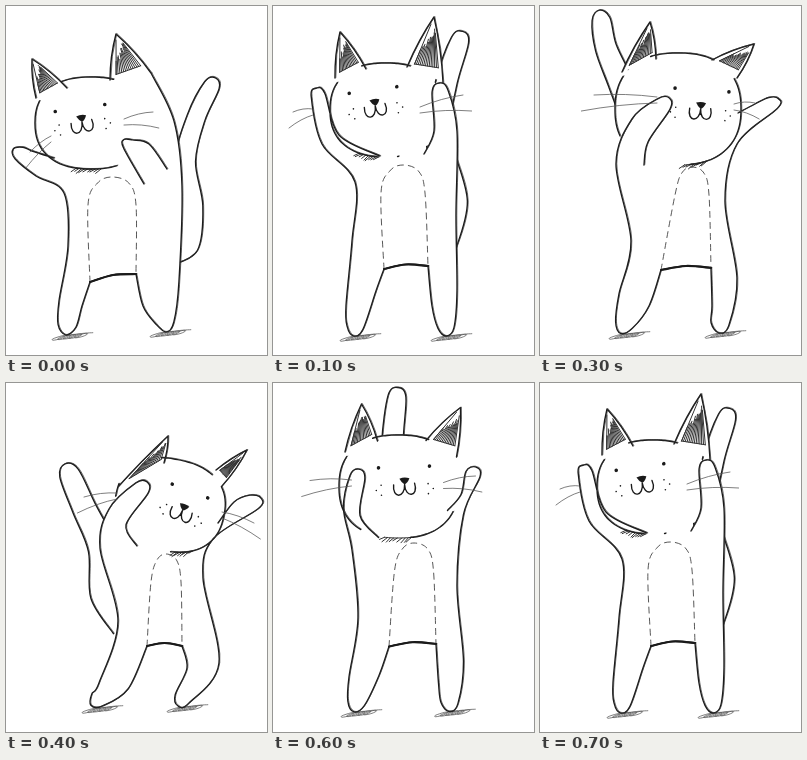
Write an HTML page that moves like this. It is 261 px wide and 349 px high and loops after 0.8 s.

```html
<!DOCTYPE html>
<html lang="en">
<head>
<meta charset="utf-8">
<title>Dancing cat</title>
<style>
  html, body { margin: 0; width: 100%; height: 100%; overflow: hidden; background: #fff; }
  svg { display: block; width: 100vw; height: 100vh; }
  path { fill: none; stroke: #1a1a1a; stroke-linecap: round; stroke-linejoin: round; }
  .fill { fill: #fff; stroke: none; }
  .ink { stroke-width: 1.4; }
  .echo { stroke-width: .7; stroke: #333; }
  .bold { stroke-width: 2.2; }
  .thin { stroke-width: .75; stroke: #555; }
  .hatch { stroke-width: 1; stroke: #333; }
  .belly { stroke-width: .9; stroke: #444; stroke-dasharray: 6 5; }
  .dot { fill: #1a1a1a; stroke: none; }
  .pose { visibility: hidden; animation: .8s step-end infinite; }
  .lean { animation-name: lean; }
  .stand { animation-name: stand; }
  .rise { animation-name: rise; }
  .sway { animation-name: sway; }
  .dip { animation-name: dip; }
  @keyframes lean { 0% { visibility: visible } 12.5%, 100% { visibility: hidden } }
  @keyframes stand { 0%, 25% { visibility: hidden } 12.5%, 87.5%, 100% { visibility: visible } }
  @keyframes rise { 0%, 37.5%, 87.5%, 100% { visibility: hidden } 25%, 75% { visibility: visible } }
  @keyframes sway { 0%, 50%, 75%, 100% { visibility: hidden } 37.5%, 62.5% { visibility: visible } }
  @keyframes dip { 0%, 62.5%, 100% { visibility: hidden } 50% { visibility: visible } }
</style>
</head>
<body>
<svg id="stage" viewBox="0 0 261 349" preserveAspectRatio="none"></svg>
<script>
// A pose is a few joints. A joint with a third value is a round tip of that radius.
// left: arm, flank, leg, crotch; right: the same in reverse; tail: centre line from the tip.
// head: x, y, rx, ry, tilt; arcs: visible parts of the head in degrees;
// face: middle of the eyes, tilt, half gap, drop to the nose; belly: top and half width.
const lean = {
  left: [[48, 152], [26, 145], [13, 147, 7], [30, 170], [58, 187], [62, 240], [53, 295], [61, 320, 9], [76, 300], [84, 276]],
  right: [[130, 268], [137, 300], [159, 317, 9], [173, 275], [176, 180], [168, 115], [145, 67]],
  paw: [[138, 178], [122, 138, 6], [143, 138], [161, 163]],
  tail: [[206, 79, 8], [190, 112], [179, 155], [185, 200], [180, 238], [160, 246]],
  head: [85, 117, 56, 46, 0], arcs: [[66, 205], [242, 290]], chin: 92,
  ears: [[[30, 92], [26, 53], [61, 82]], [[104, 74], [110, 28], [145, 67]]],
  face: [74, 102, -8, 25, 10], belly: [106, 171, 24],
  whiskers: [[45, 130, 24, 146], [118, 113, 147, 106]]
};
const stand = {
  left: [[107, 150], [66, 129], [45, 89, 7], [49, 138], [82, 176], [79, 235], [73, 300], [82, 322, 8], [103, 285], [111, 263]],
  right: [[155, 260], [159, 300], [173, 322, 8], [184, 285], [183, 210], [184, 125], [167, 85, 8], [161, 125], [151, 148]],
  tail: [[187, 34, 9], [173, 78], [165, 130], [180, 195], [165, 245]],
  head: [113, 104, 56, 47, 0], arcs: [[97, 212], [248, 292], [440, 441]], chin: 105,
  ears: [[[62, 72], [67, 26], [93, 63]], [[134, 61], [161, 11], [170, 76]]],
  face: [100, 84, -8, 24, 12], belly: [130, 159, 22],
  whiskers: [[40, 103, 20, 106], [147, 101, 190, 89]]
};
const sway = {
  left: [[104, 159], [108, 136], [124, 98, 8], [92, 113], [76, 158], [91, 235], [79, 288], [84, 319, 9], [109, 300], [121, 264]],
  right: [[171, 262], [172, 300], [180, 318, 9], [197, 272], [185, 195], [197, 138], [233, 97, 7], [215, 98], [198, 107]],
  tail: [[61, 13, 9], [66, 42], [80, 75], [92, 105], [100, 150]],
  head: [138, 103, 63, 56, 0], arcs: [[155, 212], [248, 301], [331, 442]], chin: 76,
  ears: [[[82, 66], [110, 16], [116, 53]], [[172, 54], [214, 38], [197, 72]]],
  face: [162, 84, 4, 27, 15], belly: [152, 161, 17],
  whiskers: [[117, 91, 54, 89], [194, 98, 215, 97]]
};
const dip = {
  left: [[131, 163], [120, 142], [136, 105, 8], [103, 126], [94, 165], [112, 238], [93, 300], [91, 317, 8], [122, 306], [141, 263]],
  right: [[176, 263], [181, 285], [176, 316, 8], [213, 280], [197, 195], [207, 156], [248, 119, 8], [228, 119], [212, 140]],
  tail: [[63, 90, 10], [78, 125], [96, 165], [100, 210], [122, 240]],
  head: [164, 122, 55, 46, 12], arcs: [[178, 190], [254, 306], [325, 442]], chin: 68,
  ears: [[[112, 104], [162, 53], [158, 80]], [[210, 87], [241, 67], [216, 103]]],
  face: [184, 108, 21, 19, 17], belly: [160, 171, 15],
  whiskers: [[111, 110, 78, 114], [216, 129, 248, 140]]
};

const lerp = (a, b, t) => Array.isArray(a) ? a.map((v, i) => lerp(v, b[i], t)) : a + (b - a) * t;

// Halfway between two poses, the tail swinging over the top
const rise = {};
for (const key in stand) rise[key] = lerp(stand[key], sway[key], .5);
rise.tail[0][1] -= 10;

let seed = 7;
const rnd = () => (seed = seed * 16807 % 2147483647) / 2147483647;
const rad = a => a * Math.PI / 180;
const unit = (a, b) => {
  const x = b[0] - a[0], y = b[1] - a[1], n = Math.hypot(x, y) || 1;
  return [x / n, y / n];
};
const line = (a, b) => `M${a}L${b}`;
const path = (kind, d, extra = '') => `<path class="${kind}" d="${d}" ${extra}/>`;

// Smooth curve through all points
function curve(p) {
  let d = 'M' + p[0];
  for (let i = 0; i < p.length - 1; i++) {
    const a = p[i - 1] || p[i], b = p[i], c = p[i + 1], e = p[i + 2] || c;
    const h1 = [b[0] + (c[0] - a[0]) / 6, b[1] + (c[1] - a[1]) / 6];
    const h2 = [c[0] - (e[0] - b[0]) / 6, c[1] - (e[1] - b[1]) / 6];
    d += `C${h1} ${h2} ${c}`;
  }
  return d;
}

// Replace each round tip by the points of its cap
const limb = joints => joints.flatMap((p, i) => {
  const [x, y, r] = p;
  if (!r) return [p];
  const prev = joints[i - 1];
  const [u, v] = unit(lerp(prev, joints[i + 1], .5), p);
  const s = (prev[0] - x) * -v + (prev[1] - y) * u > 0 ? r : -r;
  return [[x - v * s, y + u * s], [x + u * r, y + v * r], [x + v * s, y - u * s]];
});

// Tube around a centre line, wider towards the root
function tube(mid) {
  const r = mid[0][2], one = [], two = [];
  mid.forEach((p, i) => {
    const [u, v] = unit(mid[i - 1] || p, mid[i + 1] || p);
    const w = r * (1 + .8 * i / (mid.length - 1));
    one.unshift([p[0] - v * w, p[1] + u * w]);
    two.push([p[0] + v * w, p[1] - u * w]);
  });
  const [u, v] = unit(mid[1], mid[0]);
  return [...one, [mid[0][0] + u * r, mid[0][1] + v * r], ...two];
}

// Point on the slightly boxy head
function rim([x, y, rx, ry, tilt], angle) {
  const soft = v => Math.sign(v) * Math.abs(v) ** .85;
  const a = soft(Math.cos(rad(angle))) * rx, b = soft(Math.sin(rad(angle))) * ry;
  const c = Math.cos(rad(tilt)), s = Math.sin(rad(tilt));
  return [x + a * c - b * s, y + a * s + b * c];
}
const arc = (head, [from, to], n = 14) =>
  curve(Array.from({ length: n + 1 }, (_, i) => rim(head, lerp(from, to, i / n))));

function ear([a, tip, b]) {
  const mid = lerp(a, b, .5);
  const bow = p => {
    const m = lerp(p, tip, .5), [u, v] = unit(lerp(mid, tip, .4), m);
    return [m[0] + u * 3, m[1] + v * 3];
  };
  return `M${a}Q${bow(a)} ${tip}Q${bow(b)} ${b}`;
}

// Inner ear: strokes from the base towards the tip
function earShade([a, tip, b], n = 13) {
  const p = lerp(lerp(a, b, .15), tip, .1), q = lerp(lerp(a, b, .9), tip, .2);
  let d = line(p, lerp(p, tip, .85)) + line(p, q);
  for (let i = 0; i <= n; i++) {
    const t = i / n, foot = lerp(p, q, t);
    d += line(foot, lerp(foot, tip, .25 + .35 * t + .2 * rnd()));
  }
  return d;
}

function chinShade(head, angle, n = 8) {
  let d = arc(head, [angle - 10, angle + 10], 4);
  for (let i = 0; i <= n; i++) {
    const [x, y] = rim(head, angle - 10 + 20 * i / n);
    d += line([x, y], [x - 4 - 2 * rnd(), y + 2 + 3 * rnd()]);
  }
  return d;
}

// Flat loops under a foot
function scribble([x, y, r], n = 26) {
  const p = [];
  for (let i = 0; i <= n; i++) {
    const a = i * 1.2, c = Math.cos(a);
    p.push([x - 10 + 28 * i / n + 8 * c, y + r + 3 - 3 * i / n - 2 * c + 1.5 * Math.sin(a)]);
  }
  return curve(p);
}

function whiskerPair([x, y, x2, y2]) {
  const hair = (a, b) => `M${a}Q${lerp(a, b, .5).map((v, i) => v - 3 * i)} ${b}`;
  return hair([x, y], [x2, y2]) + hair([x, y + 6], [x2 + (x2 - x) * .2, y2 + 16]);
}

const disc = (x, y, r) => `M${x - r},${y}a${r},${r} 0 1 0 ${2 * r},0a${r},${r} 0 1 0 ${-2 * r},0`;

function face([x, y, tilt, gap, drop]) {
  let dots = disc(-gap, 0, 1.8) + disc(gap, 0, 1.8);
  for (const side of [-1, 1])
    for (let i = 0; i < 3; i++) dots += disc(side * (gap + i % 2 * 5 - 2), drop + 4 + 5 * i, .8);
  return `<g transform="translate(${x} ${y}) rotate(${tilt})">` + path('dot', dots) +
    `<g transform="translate(0 ${drop})">` +
    path('dot', 'M-5,-2Q0,-4 5,-2Q3,3 0,4Q-3,2 -5,-2Z') +
    path('ink', 'M-11,4C-13,18 0,18 0,4C0,18 14,17 10,3') + '</g></g>';
}

function draw(name, p) {
  const left = limb(p.left), right = limb(p.right), tail = curve(tube(p.tail));
  const hips = [left.at(-1), right[0]];
  const [bx, by, bw] = p.belly;
  const ears = p.ears.map(ear).join('');
  const hip = curve([hips[0], [lerp(...hips, .5)[0], lerp(...hips, .5)[1] - 3], hips[1]]);
  const paw = p.paw ? curve(limb(p.paw)) : '';
  const lines = curve(left) + hip + curve(right) + paw + ears + p.arcs.map(a => arc(p.head, a)).join('');
  const feet = [...p.left, ...p.right].filter(j => j[2] && j[1] > 250);
  const echo = 'transform="translate(.8 -.5)"';
  return `<g class="pose ${name}">` +
    path('thin', feet.map(f => scribble(f)).join('')) +
    path('ink', tail) + path('echo', tail, echo) +
    path('fill', curve([...left, ...right]) + 'Z') +
    path('fill', arc(p.head, [0, 360], 24)) + path('fill', ears) +
    path('belly', curve([hips[0], [bx - bw, by + 28], [bx - bw * .6, by + 6], [bx, by], [bx + bw * .7, by + 6], [bx + bw, by + 28], hips[1]])) +
    path('hatch', p.ears.map(e => earShade(e)).join('') + chinShade(p.head, p.chin)) +
    path('ink', lines) + path('echo', lines, echo) + path('bold', hip) +
    path('thin', p.whiskers.map(whiskerPair).join('')) +
    face(p.face) + '</g>';
}

document.getElementById('stage').innerHTML =
  Object.entries({ lean, stand, rise, sway, dip }).map(([name, p]) => draw(name, p)).join('');
</script>
</body>
</html>
```
